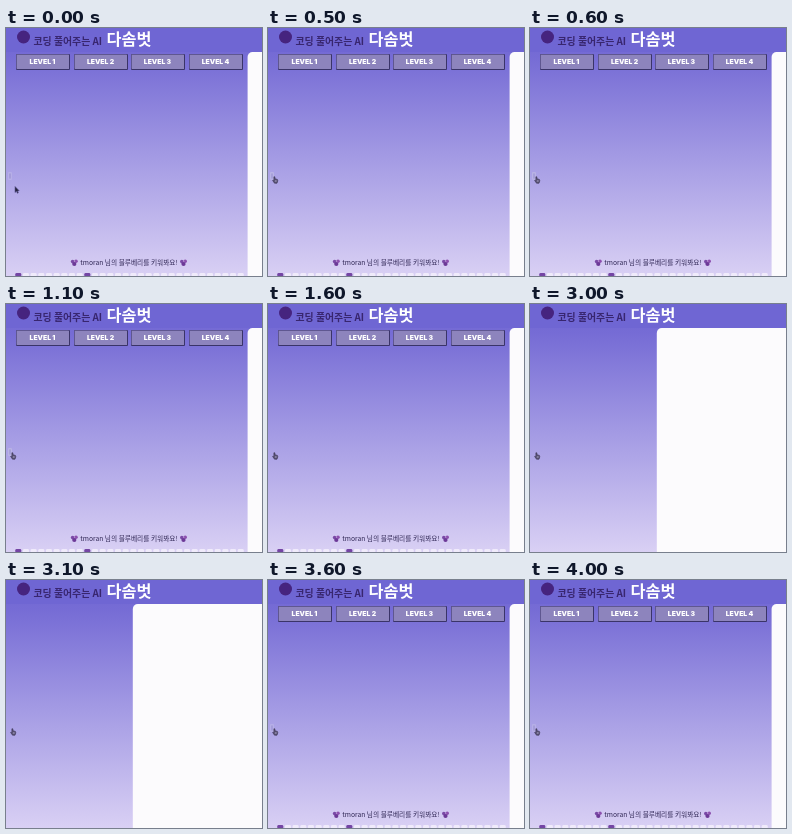
These frames come from a looping animation (256x248 px, 4.1 s). An HTML page with a canvas:

```html
<!DOCTYPE html>
<html lang="ko">
<head>
<meta charset="utf-8">
<style>
html, body { margin: 0; width: 100%; height: 100%; overflow: hidden; background: #7067d3; }
canvas { display: block; width: 256px; height: 248px; }
</style>
</head>
<body>
<canvas id="stage" width="256" height="248"></canvas>
<script>
const LOOP = 4100;
const KO = '"Noto Sans CJK KR", "Noto Sans CJK", "Noto Sans", sans-serif';
const LATIN = 'Inter, "Noto Sans", sans-serif';
const ctx = document.getElementById('stage').getContext('2d');

function rect(x, y, w, h, color, r = 0) {
  ctx.fillStyle = color;
  ctx.beginPath();
  ctx.roundRect(x, y, w, h, r);
  ctx.fill();
}

function dot(x, y, r, color) {
  ctx.fillStyle = color;
  ctx.beginPath();
  ctx.arc(x, y, r, 0, Math.PI * 2);
  ctx.fill();
}

function label(str, x, y, font, color, align = 'left') {
  ctx.font = font;
  ctx.fillStyle = color;
  ctx.textAlign = align;
  ctx.fillText(str, x, y);
}

function shape(points, fill, stroke) {
  ctx.beginPath();
  points.forEach(([x, y]) => ctx.lineTo(x, y));
  ctx.closePath();
  ctx.fillStyle = fill;
  ctx.fill();
  ctx.strokeStyle = stroke;
  ctx.lineWidth = 0.6;
  ctx.stroke();
}

function background() {
  const g = ctx.createLinearGradient(0, 0, 0, 248);
  g.addColorStop(0, '#6e65d2');
  g.addColorStop(0.12, '#766cd5');
  g.addColorStop(0.5, '#a198e3');
  g.addColorStop(1, '#d9d0f4');
  ctx.fillStyle = g;
  ctx.fillRect(0, 0, 256, 248);
  rect(0, 0, 256, 24, '#6f66d3');
}

function header() {
  dot(17.5, 9, 6.5, '#46247f');
  label('코딩 풀어주는 AI', 27.5, 16.8, '900 9.9px ' + KO, '#38266f');
  label('다솜벗', 100.5, 16.8, '900 16.3px ' + KO, '#fff');
}

function levelButton(i) {
  const x = Math.round(10.4 + i * 57.4), y = 26, w = 54, h = 16;
  rect(x, y, w, h, '#3a3468', 1);
  rect(x, y, w - 1, h - 1, '#5f5790', 1);
  rect(x + 1, y + 1, w - 2, h - 2, '#8d84bd');
  label('LEVEL ' + (i + 1), x + w / 2 - 0.5, 36.2, '900 6.8px ' + LATIN, '#fff', 'center');
}

function berry(x) {
  dot(x - 1.7, 233.6, 1.8, '#7a4aa6');
  dot(x + 1.7, 233.3, 1.8, '#8c4fae');
  dot(x, 236, 2.1, '#6c3997');
  dot(x + 0.3, 233.2, 0.7, '#b58ad0');
}

function sidebar() {
  for (let i = 0; i < 4; i++) levelButton(i);
  berry(68.3);
  berry(177.5);
  label('tmoran 님의 블루베리를 키워봐요!', 123, 237, '6.7px ' + KO, '#2f2654', 'center');
  for (let i = 0; i < 30; i++) {
    const color = i === 0 || i === 9 ? '#7445a4' : '#f0ebfb';
    rect(9.3 + i * 7.67, 245, 6, 6, color, 1.3);
  }
}

function panel(x) {
  rect(x, 24, 270, 240, '#fcfbfd', 5);
}

function handle(open, hover) {
  if (!open) {
    rect(2, 145, 3, 4, 'rgba(220,214,248,.45)', 1);
    return;
  }
  rect(2, 144, 4, 8, hover ? 'rgba(190,184,228,.75)' : 'rgba(190,184,232,.6)', 1);
  rect(3.5, 145.5, 1, 5, 'rgba(120,110,185,.55)');
}

function arrow(x, y) {
  shape([[x, y], [x, y + 6], [x + 1.4, y + 4.8], [x + 2.4, y + 6.8],
    [x + 3.4, y + 6.3], [x + 2.5, y + 4.4], [x + 4.2, y + 4.2]], '#25233b', '#5c5592');
}

function hand(x, y) {
  shape([[x + 1.3, y], [x + 2.2, y], [x + 2.5, y + 2], [x + 4.8, y + 2.6],
    [x + 5.2, y + 4], [x + 4.4, y + 6.4], [x + 1.9, y + 6.4],
    [x, y + 3.6], [x + 1.3, y + 3.6]], '#5b5575', '#383253');
  rect(x + 2.3, y + 3.7, 1.7, 1, '#aaa3ca');
}

function draw(t) {
  const open = t < 2000 || t >= 3600;
  const showHandle = t < 1600 || (t >= 2000 && t < 3000) || t >= 3600;
  background();
  header();
  if (open) sidebar();
  panel(open ? 241.6 : 126.8);
  if (showHandle) handle(open, t >= 500 && t < 1600);
  if (t < 500) arrow(9, 158.5);
  else hand(4.6, 148.8);
}

const start = performance.now();
function tick() {
  draw((performance.now() - start) % LOOP);
  requestAnimationFrame(tick);
}
tick();
</script>
</body>
</html>
```
